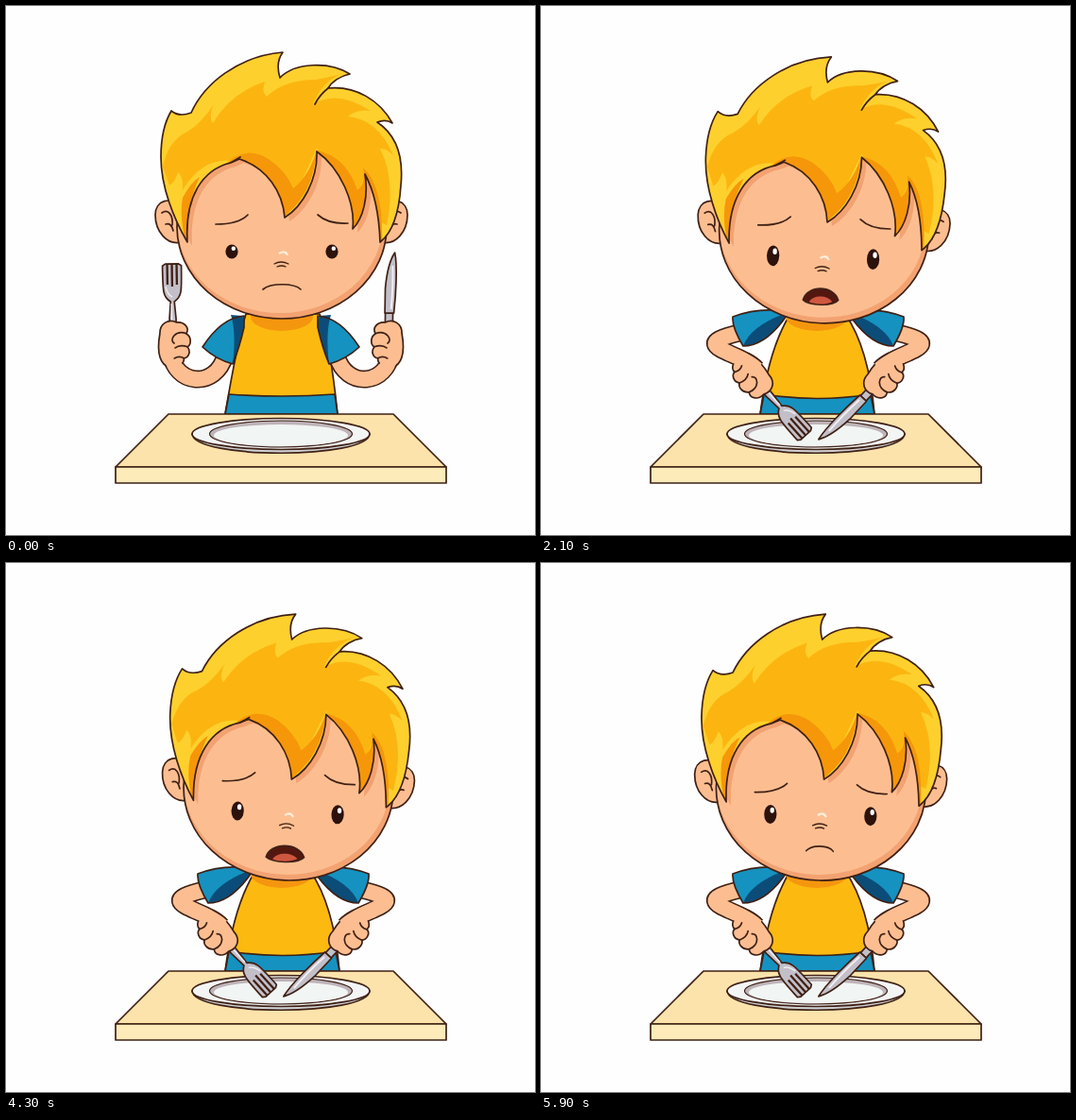
An HTML page that plays this animation: 560x560 px, repeating every 6 s.

```html
<!DOCTYPE html>
<html lang="en">
<head>
<meta charset="utf-8">
<title>Sad dinner</title>
<style>
html, body { margin: 0; width: 100%; height: 100%; overflow: hidden; background: #fefefe; }
svg { display: block; width: 560px; height: 560px; }
.ink { stroke: #3f2015; stroke-width: 1.7; stroke-linejoin: round; stroke-linecap: round; }
.line { fill: none; }
.skin { fill: #fcbe91; }
.shade { fill: #f3a271; }
.steel { fill: #c3bfc8; }
.light { fill: #1592c0; }
.dark { fill: #0b4d78; }
.limb { fill: none; stroke: #3f2015; stroke-width: 19; }
.limb.fill { stroke: #fcbe91; stroke-width: 15.8; }
.wrist { fill: none; stroke: #fcbe91; stroke-width: 15.8; stroke-dasharray: .42 2; }
</style>
</head>
<body>
<svg viewBox="0 0 560 560">
  <defs>
    <path id="hair" d="M192,250 C178,226 164,192 164,160 C164,136 169,121 175,111 C181,116 188,116 196,113
      C210,82 246,53 293,49 C287,57 287,66 290,76 C305,60 342,58 364,72 C354,74 345,80 341,87
      C370,84 396,100 409,124 C403,120 398,121 393,123 C414,137 421,160 418,190
      C416,220 409,240 396,250 C395,222 391,198 380,178 C384,202 378,225 367,236
      C370,208 354,172 329,154 C330,184 314,212 295,224 C293,197 276,171 247,162 L238,166
      C208,173 189,202 192,250Z"/>
    <ellipse id="face" cx="292" cy="234" rx="111" ry="97"/>
    <clipPath id="inFace"><use href="#face"/></clipPath>
    <clipPath id="inHair"><use href="#hair"/></clipPath>
    <path id="fist" d="M-14,-10 C-14,-22 -4,-26 4,-22 C12,-23 18,-16 14,-10 C20,-6 19,2 15,4
      C19,9 16,16 11,16 C12,22 4,26 -4,25 C-14,24 -18,10 -14,-10Z"/>
    <path id="fingers" d="M14,-10 Q6,-13 1,-8 M15,4 Q7,1 2,5 M11,16 Q6,13 1,16 M1,-8 Q-3,-3 1,0"/>
    <g id="fork">
      <path class="ink steel" d="M-3,27 Q0,31 3,27 L3.5,-26 L2,-44 C10,-49 10,-54 10,-82 L7,-84 L-7,-84 L-10,-82
        C-10,-54 -10,-49 -2,-44 L-3.5,-26Z"/>
      <path class="line" stroke="#3f2015" stroke-width="2.3" d="M-5,-84V-62 M0,-84V-60 M5,-84V-62"/>
      <path class="line" stroke="#eeecf2" stroke-width="1.5" d="M-7,-60Q-5,-51 0,-49 M-1,-42V-24"/>
    </g>
    <g id="knife">
      <path class="ink steel" d="M-4,27 Q0,31 4,27 L4,-32 L-4,-32Z"/>
      <path class="ink steel" d="M4.5,-32 L4.5,-58 C3,-78 -1,-90 -5,-96 C-8,-82 -7,-52 -5,-32Z"/>
      <path class="line" stroke="#f0eef3" stroke-width="2" d="M-3,-82 Q-4,-60 -2,-36"/>
    </g>
  </defs>

  <path class="ink" fill="#fcba10" data-pose="torso"/>
  <ellipse id="bib" cx="292" cy="329" rx="33" ry="15" fill="#f5960f"/>
  <path class="ink light" data-pose="hem"/>
  <g class="side"><g class="sleeves"></g></g>
  <g class="side"><g class="sleeves"></g></g>

  <g id="head">
    <g id="ears">
      <g id="ear">
        <path class="ink skin" d="M186,214 C174,200 158,206 158,221 C158,238 170,254 186,250Z"/>
        <path class="ink line" d="M165,219 C172,214 177,222 176,232 M169,231 Q175,229 177,238"/>
      </g>
      <use href="#ear" transform="translate(583) scale(-1 1)"/>
    </g>
    <use href="#face" class="shade"/>
    <g clip-path="url(#inFace)">
      <ellipse cx="290" cy="229" rx="109" ry="96" class="skin"/>
      <use href="#hair" class="shade" transform="translate(5 4)"/>
    </g>
    <use href="#face" class="ink line"/>
    <g id="brows" class="ink line" stroke-width="2">
      <path d="M222,231 Q246,231 256,221 M330,221 Q341,231 362,230"/>
    </g>
    <g id="eyes"></g>
    <path d="M289,262 Q296,258 298,264" class="line" stroke="#fff0df" stroke-width="2.2"/>
    <path d="M284,273 Q291,269 299,273 M287,276 Q292,274 296,276" class="ink line" style="stroke-width:1.3"/>
    <g id="mouth">
      <path class="ink" fill="#541710"/>
      <path fill="#cf573f" d="M278,309 C282,301 299,301 304,308 C297,311.500 284,311.500 278,309Z"/>
    </g>
    <use href="#hair" fill="#fdd02d"/>
    <g clip-path="url(#inHair)">
      <path fill="#fcb510" d="M166,170 Q172,142 192,133 Q207,124 220,104 Q214,117 219,124 Q238,92 274,80
        Q270,91 276,96 Q294,78 328,78 Q348,74 354,72 Q334,81 325,104 Q350,88 386,111 Q372,109 362,117
        Q394,120 410,158 Q402,150 396,151 Q413,185 403,232 L391,226 L380,178 L364,222 L329,150
        L296,224 Q270,175 240,164 Q208,160 187,195 Q188,180 182,176 Q178,188 173,190Z"/>
      <path fill="#f59709" d="M230,170 Q252,146 278,162 Q297,175 304,193 Q322,179 329,151 Q326,202 290,226
        Q285,184 248,164Z M329,153 Q360,159 372,195 Q381,188 378,171 Q400,190 398,254 L384,190
        Q387,224 366,238 Q366,190 329,153Z M191,252 Q183,224 187,203 Q196,186 205,181 Q192,208 191,252Z"/>
      <path class="ink line" d="M341,87 Q332,94 327,104 M236,167 L248,160 M239,170 L251,164"/>
    </g>
    <use href="#hair" class="ink line"/>
  </g>

  <g class="ink">
    <path fill="#fbe3ab" d="M172,432 H410 L466,488 H116Z"/>
    <path fill="#fdebb9" d="M116,488 H466 V505 H116Z"/>
    <path fill="#cfd0d2" d="M197,453 C199,480 383,480 385,453Z"/>
    <ellipse cx="291" cy="453" rx="94" ry="16.500" fill="#f3f5f5"/>
    <ellipse cx="291" cy="453" rx="75.500" ry="14" fill="#bdb3b8" stroke-width="1.200"/>
    <ellipse cx="291" cy="454.500" rx="71" ry="11.500" fill="#f1f5f3" stroke="none"/>
  </g>
  <g class="side"><g class="hand"></g></g>
  <g class="side"><g class="hand"></g></g>
</svg>
<script>
const $ = s => document.querySelector(s), all = s => [...document.querySelectorAll(s)];
const LOOP = 6000, STEP = 100;

// Three poses per shape: arms raised, arms swinging, cutlery on the plate.
const poses = {
  torso: ['M254,326 Q245,355 232,432 L351,432 Q343,355 332,326Z',
          'M254,326 Q245,355 232,432 L351,432 Q343,355 332,326Z',
          'M264,326 Q241,362 232,432 L353,432 Q347,362 322,326Z'],
  hem: ['M236,411 Q293,415 348,411 L351,432 L232,432Z',
        'M236,411 Q293,415 348,411 L351,432 L232,432Z',
        'M236,411 Q292,420 349,411 L353,432 L232,432Z'],
  sleeve: ['M252,328 Q228,330 208,361 Q222,374 240,379 Q247,362 252,340Z',
           'M252,328 Q225,332 201,357 Q212,365 226,367 Q246,364 252,340Z',
           'M262,324 Q232,318 203,329 Q202,340 214,360 Q236,360 257,332Z'],
  fold: ['M238,327 Q244,345 240,379 Q247,362 252,340 Q252,332 250,328Z',
         'M240,330 Q240,345 226,367 Q246,364 252,340 Q252,332 250,328Z',
         'M262,324 Q222,338 214,360 Q236,360 257,332 Q260,328 262,324Z'],
  limb: ['M174,366 C178,402 222,406 232,370',
         'M199,380 C204,372 208,364 215,354',
         'M228,384 C212,366 150,360 210,346']
};
const grip = [[177, 357], [199, 380], [224, 392]];
const turn = [[-1, 68, 138], [-1, 45, 137]];
const mirror = [582, 585, 587];

const lips = ['M272,300 C280,293 305,293 312,300 C305,293 280,293 272,300Z',
              'M271,307 C275,291 305,290 311,306 C305,313 278,313 271,307Z'];

const tracks = {
  pose: [[0, 0], [700, 1], [1300, 2]],
  x: [[0, 0], [700, .5], [1500, 5], [2800, 3], [3700, 3], [4800, 4], [5900, 2.4]],
  y: [[0, 0], [700, 5.5], [1450, -1], [2200, 5], [2600, 6.5], [2850, 6], [3500, -2], [3700, -2],
      [4250, 5], [4800, 0], [5100, -2], [5650, 4], [5900, 5]],
  tilt: [[0, 0], [700, 0], [1500, 2.4], [2800, 1.7], [3700, 1.6], [4800, 2.4], [5900, 1.2]],
  brow: [[0, 0], [700, 9], [1500, -8], [2800, 7], [3700, -13], [4800, 5], [5900, 8]],
  lid: [[0, 7.5], [300, 10], [700, 10], [1500, 11.5], [2800, 10], [3700, 15], [4300, 10], [4800, 8], [5200, 12], [5900, 10]],
  eyeY: [[0, 260], [700, 262], [1500, 261], [2800, 262], [3700, 256], [4800, 262]],
  open: [[700, 0], [1100, 1], [5300, 1], [5700, 0]],
  wide: [[0, 1], [1500, 1], [2800, .85], [3700, 1.05], [4800, .97], [5900, .72]]
};

const lerp = (a, b, k) => a + (b - a) * k;

function at(keys, t) {
  const i = keys.findIndex(k => k[0] > t);
  if (i < 0) return keys[keys.length - 1][1];
  if (!i) return keys[0][1];
  const [t0, a] = keys[i - 1], [t1, b] = keys[i], k = (t - t0) / (t1 - t0);
  return lerp(a, b, k * k * (3 - 2 * k));
}

function morph(a, b, k) {
  const ends = b.match(/-?[\d.]+/g);
  let i = 0;
  return a.replace(/-?[\d.]+/g, n => lerp(+n, +ends[i++], k).toFixed(2));
}

// Blend a three-entry list of numbers or paths at p in 0..2.
function blend(list, p) {
  const i = Math.min(1, Math.floor(p)), mix = typeof list[0] === 'string' ? morph : lerp;
  return mix(list[i], list[i + 1], p - i);
}

all('.sleeves').forEach(g => g.innerHTML = `
  <path class="limb" data-pose="limb"/><path class="limb fill" data-pose="limb"/>
  <path class="light" data-pose="sleeve"/><path class="dark" data-pose="fold"/>
  <path class="ink line" data-pose="sleeve"/>`);
all('.hand').forEach((g, i) => g.innerHTML = `
  <g class="grip"><use href="#${i ? 'knife' : 'fork'}"/><use href="#fist" class="ink skin"/></g>
  <path class="wrist" pathLength="1" data-pose="limb"/>
  <g class="grip"><use href="#fingers" class="ink line"/></g>`);
$('#eyes').innerHTML = [239, 345].map(x => `<g data-x="${x}">
  <ellipse rx="6.6" ry="1" fill="#2c120b"/><ellipse cx="1.8" cy="-.42" rx="2.2" ry=".3" fill="#fff"/></g>`).join('');

const shaped = all('[data-pose]'), sides = all('.side'), eyes = all('#eyes g');
const [lip, tongue] = $('#mouth').children;

function draw(t) {
  const v = {};
  for (const name in tracks) v[name] = at(tracks[name], t);

  shaped.forEach(el => el.setAttribute('d', blend(poses[el.dataset.pose], v.pose)));
  sides.forEach((g, i) => {
    const right = i % 2;
    if (right) g.setAttribute('transform', `translate(${blend(mirror, v.pose)}) scale(-1 1)`);
    const x = blend(grip.map(p => p[0]), v.pose), y = blend(grip.map(p => p[1]), v.pose);
    g.querySelectorAll('.grip').forEach(h =>
      h.setAttribute('transform', `translate(${x} ${y}) rotate(${blend(turn[right], v.pose)})`));
  });

  $('#head').setAttribute('transform', `translate(${v.x} ${v.y}) rotate(${v.tilt} 291 330)`);
  $('#brows').setAttribute('transform', `translate(0 ${v.brow})`);
  eyes.forEach(e => e.setAttribute('transform', `translate(${e.dataset.x} ${v.eyeY}) scale(1 ${v.lid})`));
  $('#mouth').setAttribute('transform', `translate(${292 * (1 - v.wide)}) scale(${v.wide} 1)`);
  lip.setAttribute('d', morph(lips[0], lips[1], v.open));
  tongue.style.opacity = v.open > .6 ? 1 : 0;
}

const start = performance.now();
function tick() {
  const t = (performance.now() - start) % LOOP;
  draw(Math.floor(t / STEP) * STEP);
  requestAnimationFrame(tick);
}
tick();
</script>
</body>
</html>
```
